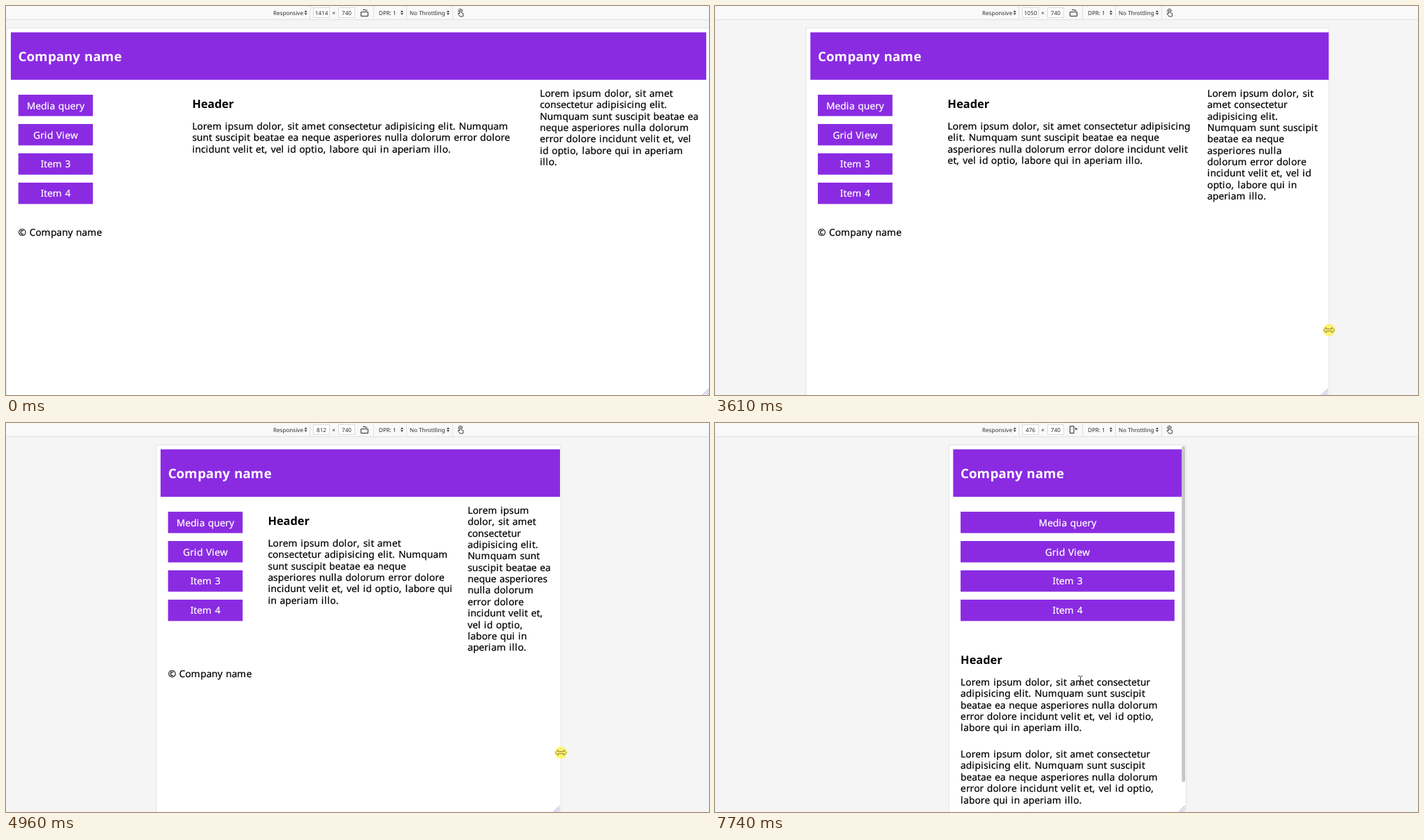
Write an HTML page with a canvas that moves like this. It is 1005 px wide and 557 px high and loops after 8000 ms.

```html
<!DOCTYPE html>
<html lang="en">
<head>
<meta charset="utf-8">
<title>Responsive layout</title>
<style>
  html, body { margin: 0; width: 100%; height: 100%; overflow: hidden; background: #f5f5f6; }
  canvas { display: block; width: 1005px; height: 557px; }
</style>
</head>
<body>
<canvas id="stage" width="1005" height="557"></canvas>
<script>
const ctx = document.getElementById('stage').getContext('2d');
const LOOP = 8000, SCALE = 32 / 45, MID = 504, TOP = 32, BOTTOM = 558;
const EM = 20 * SCALE, LINE = 23 * SCALE, PAD = 15 * SCALE, MARGIN = 8 * SCALE;
const PURPLE = '#8a2be2', INK = '#000';
const ITEMS = ['Media query', 'Grid View', 'Item 3', 'Item 4'];
const LOREM = ('Lorem ipsum dolor, sit amet consectetur adipisicing elit. Numquam sunt suscipit ' +
  'beatae ea neque asperiores nulla dolorum error dolore incidunt velit et, vel id optio, ' +
  'labore qui in aperiam illo.').split(' ');

// time, viewport width, width used by the layout (lags while dragging), pointer y
const KEYS = [
  [0, 1414, 1414, 458], [2450, 1414, 1414, 458], [2600, 1370, 1370, 457], [2800, 1370, 1370, 457],
  [2930, 1344, 1344, 456], [3610, 1050, 1060, 464], [3620, 1050, 1060, 464], [3790, 998, 998, 466],
  [3940, 998, 998, 466], [4450, 888, 892, 470], [4760, 830, 830, 471], [4950, 830, 830, 471],
  [4960, 812, 819, 472], [5420, 722, 722, 475], [6200, 722, 722, 475], [6210, 720, 720, 475],
  [6750, 476, 476, 481], [LOOP, 476, 476, 481]
];

function stateAt(t) {
  const i = KEYS.findIndex((k, n) => n && t < k[0]);
  const a = KEYS[i - 1], b = KEYS[i];
  const p = Math.floor((t - a[0]) / 50) * 50 / (b[0] - a[0]);
  return a.map((v, n) => v + (b[n] - v) * p).slice(1);
}

// Humanist spacing: slightly condensed letters, roomy narrow glyphs and spaces
const TIGHT = 0.968, advances = {};
function advance(ch, weight) {
  if ('il'.includes(ch)) return 0.292;
  if (' .,'.includes(ch)) return 0.316;
  const key = weight + ch;
  if (!(key in advances)) {
    ctx.font = `${weight} 1000px "Noto Sans", sans-serif`;
    advances[key] = ctx.measureText(ch).width / 1000 * TIGHT + (ch === 'm' ? 0.03 : 0);
  }
  return advances[key];
}
const widthOf = (s, size = EM, weight = 400) =>
  size * [...s].reduce((sum, ch) => sum + advance(ch, weight), 0);

function text(s, x, y, color = INK, size = EM, weight = 400) {
  const steps = [...s].map(ch => advance(ch, weight) * size);
  ctx.font = `${weight} ${size * TIGHT}px "Noto Sans", sans-serif`;
  ctx.fillStyle = ctx.strokeStyle = color;
  ctx.lineWidth = 0.22;
  [...s].forEach((ch, i) => {
    ctx.fillText(ch, x, y);
    if (weight === 400) ctx.strokeText(ch, x, y);
    x += steps[i];
  });
}

function wrap(width) {
  const lines = [];
  let line = '';
  for (const word of LOREM) {
    const next = line ? line + ' ' + word : word;
    if (line && widthOf(next) > width + 0.3) { lines.push(line); line = word; }
    else line = next;
  }
  return [...lines, line];
}

function paragraph(x, y, width) {
  const lines = wrap(width);
  lines.forEach((s, i) => text(s, x, y + i * LINE + 5));
  return y + lines.length * LINE;
}

function rect(x, y, w, h, color) {
  ctx.fillStyle = color;
  ctx.fillRect(x, y, w, h);
}

function path(d, x, y, stroke, fill, width = 1) {
  ctx.save();
  ctx.translate(x, y);
  const p = new Path2D(d);
  if (fill) { ctx.fillStyle = fill; ctx.fill(p); }
  if (stroke) { ctx.strokeStyle = stroke; ctx.lineWidth = width; ctx.stroke(p); }
  ctx.restore();
}

function label(s, x, align = 'left') {
  ctx.font = '8.1px "Noto Sans", sans-serif';
  ctx.textAlign = align;
  ctx.fillStyle = '#2c2c32';
  ctx.fillText(s, x, 12.5);
  ctx.textAlign = 'left';
}

function toolbar(width) {
  rect(0, 0, 1005, 20, '#f9f9fa');
  rect(0, 19, 1005, 1, '#e1e1e3');
  for (const x of [434, 525, 572, 638]) rect(x, 0, 1, 19, '#e1e1e3');
  for (const x of [439, 475]) {
    rect(x, 2, 24, 15, '#dcdcdf');
    rect(x + 1, 3, 22, 13, '#fff');
  }
  label('Responsive', 382);
  label(String(Math.round(width)), 451, 'center');
  label('×', 468.5, 'center');
  label('740', 487, 'center');
  label('DPR: 1', 533);
  label('No Throttling', 577);
  for (const x of [428.5, 566, 632])
    path('M-2 -.8L0 -3.2L2 -.8ZM-2 .8L0 3.2L2 .8Z', x, 9.5, null, '#2c2c32');
  if (width > 740) path('M.5 4.5H10.5V10.5H.5ZM3 1.5H6Q8 1.5 8 3M6.5 1.5L8 3L9.5 1.5', 507, 4, '#2c2c32');
  else path('M.5 .5H6V10.5H.5ZM7.5 3H8Q9.5 3 9.5 5.5M8 4L9.5 5.8L11 4', 507, 4, '#2c2c32');
  path('M-2 4L-4 1.5Q-3.5 0 -1.5 1.5V-3Q-.5 -4.2 .5 -3V0L3.5 1Q4.2 2 3.2 5.5H-1ZM-3.2 -1Q-4 -5 -.5 -5.3Q3 -5 2.5 -1.5',
    650, 9.5, '#2c2c32', null, 0.9);
}

function page(width, layout) {
  const left = MID - width * SCALE / 2, w = width * SCALE, right = left + w;
  rect(left - 0.8, TOP - 0.8, w + 1.6, 540, '#dedee1');
  rect(left, TOP, w, 540, '#fff');

  ctx.save();
  ctx.beginPath();
  ctx.rect(left, TOP, w, 540);
  ctx.clip();

  const x = left + MARGIN, full = layout * SCALE - 2 * MARGIN, wide = layout > 768;
  const col = x + PAD, inner = full - 2 * PAD;
  rect(x, TOP + MARGIN, full, 68, PURPLE);
  text('Company name', col, 79, '#fff', 19.3, 700);

  const itemWidth = wide ? 150 * SCALE : inner;
  ITEMS.forEach((s, i) => {
    const y = 127.05 + i * 59 * SCALE;
    rect(col, y, itemWidth, 43 * SCALE, PURPLE);
    text(s, col + (itemWidth - widthOf(s)) / 2, y + 20.5, '#fff');
  });

  const menuEnd = 324;
  const mainX = wide ? col + full / 4 : col, mainY = wide ? 125 : menuEnd;
  const mainWidth = wide ? full / 2 - 2 * PAD : inner;
  text('Header', mainX, mainY + 20.7, INK, 16.9, 700);
  const mainEnd = paragraph(mainX, mainY + 47, mainWidth) + 2 * PAD;

  const asideEnd = wide
    ? paragraph(col + full * 0.75, 125, full / 4 - 2 * PAD) + 2 * PAD
    : paragraph(col, mainEnd, inner) + 2 * PAD;
  const footer = Math.max(menuEnd, asideEnd);
  text('© Company name', col, footer + 5);

  const view = BOTTOM - TOP, content = footer + 30 - TOP;
  if (content > view) {
    ctx.fillStyle = '#c6c6c9';
    ctx.beginPath();
    ctx.roundRect(right - 6, TOP + 1, 5, view * view / content, 2.5);
    ctx.fill();
  }
  ctx.restore();
  path('M-9 10L0 1M-6 10L0 4M-3 10L0 7', Math.min(right - 1, 1005), 547, '#a39cc4');
}

function resizePointer(x, y, pressed) {
  if (pressed) {
    ctx.fillStyle = 'rgba(255,240,30,.62)';
    ctx.beginPath();
    ctx.arc(x, y, 8.7, 0, 7);
    ctx.fill();
  }
  path('M-8 0L-4 -4V-1.4H4V-4L8 0L4 4V1.4H-4V4Z', x, y,
    pressed ? '#85751f' : '#222', pressed ? '#fff27a' : '#fff', 0.9);
}

function pointer(t, width, y) {
  const edge = MID + 0.6 + width * SCALE / 2;
  if (t >= 650 && t < 700) path('M0 0V12L3 9H8Z', 908.5, 554.5, '#222', '#fff');
  if (t >= 1340 && t < 7460) resizePointer(edge, t < 1820 ? 461 : y, t >= 1820);
  if (t >= 7460) {
    const p = Math.min(1, (Math.floor((t - 7460) / 47) + 1) / 7);
    const ease = p * (2 - p);
    path('M-3 -6H-1L0 -5L1 -6H3M0 -5V5M-3 6H-1L0 5L1 6H3',
      Math.round(edge + (519 - edge) * ease) + 0.5, y + (366 - y) * ease, '#333');
  }
}

function draw(now) {
  const t = now % LOOP;
  const [width, layout, y] = stateAt(t);
  rect(0, 0, 1005, 557, '#f5f5f6');
  page(width, layout);
  toolbar(width);
  pointer(t, width, y);
  requestAnimationFrame(draw);
}

ctx.textRendering = 'geometricPrecision';
requestAnimationFrame(draw);
</script>
</body>
</html>
```
